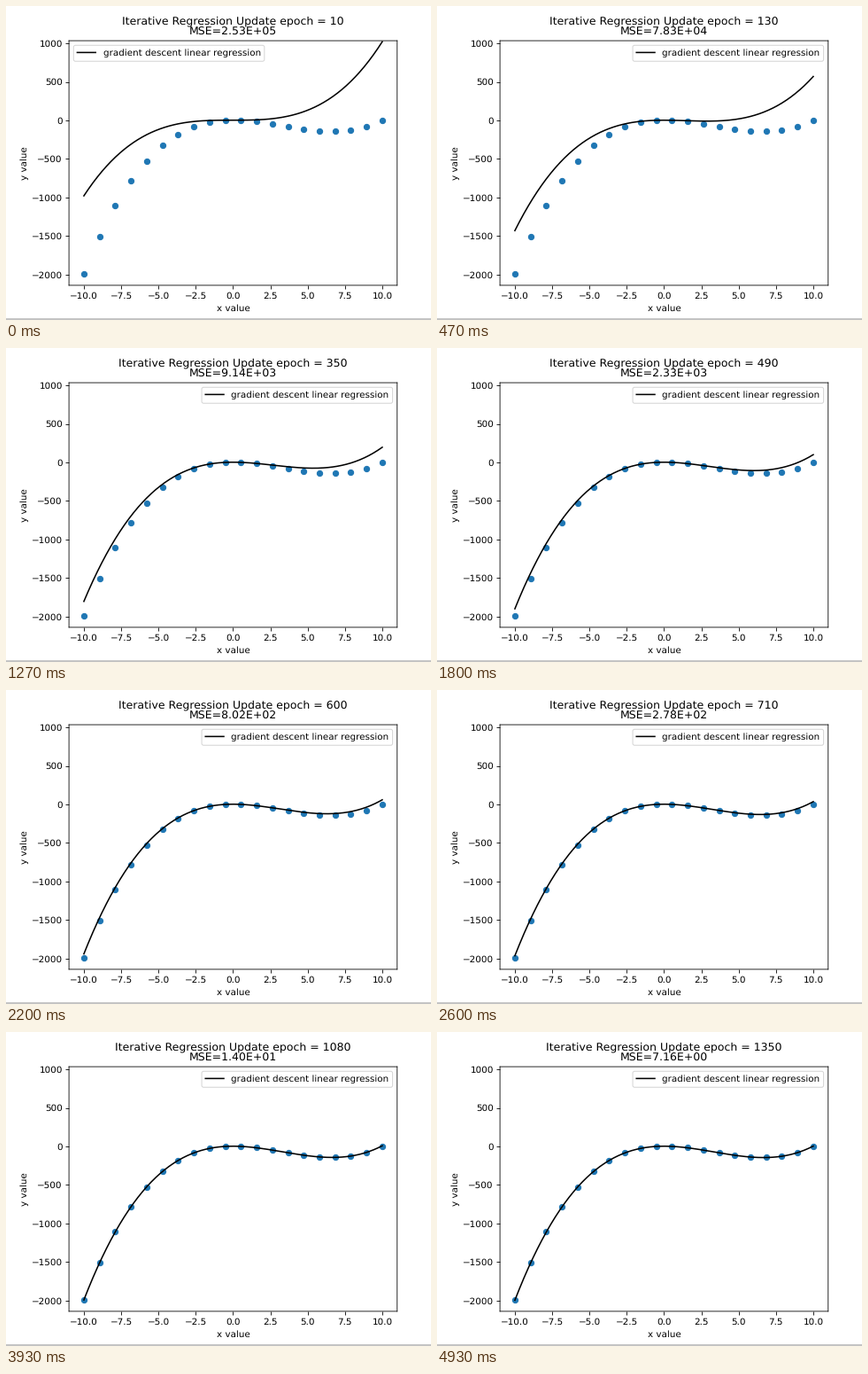
These frames come from a looping animation (480x354 px, 4990 ms). A matplotlib script:

```python
import matplotlib.pyplot as plt
import numpy as np
from matplotlib.animation import FuncAnimation
from matplotlib.lines import Line2D

W, H, DPI = 480, 354, 75
LOOP_MS, FRAMES = 4990, 75
EPOCHS_PER_LOG = 10
LOGS_PER_FRAME = 1.814      # the training log is sampled down to the frame rate

DECAY = 0.009764            # squared-error decay per epoch
MSE_START, MSE_FLOOR = 252600, 6.635
QUAD_ERROR = 10.185         # initial error of the quadratic coefficient

# soft, unsnapped edges, like a plot scaled down on screen
plt.rcParams.update({
    "font.family": "DejaVu Sans",
    "font.size": 9.97,
    "path.snap": False,
    "text.hinting": "none",
})

fig = plt.figure(figsize=(W / DPI, H / DPI), dpi=DPI, facecolor="white")
left, right, top, bottom = 71.1, 441.8, 39.1, 314.9
ax = fig.add_axes([left / W, 1 - bottom / H, (right - left) / W, (bottom - top) / H])
ax.set(xlim=(-11, 11), ylim=(-2140, 1034))
ax.set_xlabel("x value")
ax.set_ylabel("y value", labelpad=3)

xs = np.linspace(-10, 10, 20)
ax.scatter(xs, xs**3 - 10 * xs**2 + 5, color="C0", snap=False)

grid = np.linspace(-10, 10, 200)
curve, = ax.plot([], [], color="black", label="gradient descent linear regression")
ax.legend(loc="best")
title = ax.set_title("", linespacing=1.05)

# thin rule along the lower edge of the stage
fig.add_artist(Line2D([0, 1], [1 / H, 1 / H], color="#8c8c8c", lw=1, snap=True))


def update(i):
    epoch = EPOCHS_PER_LOG * (1 + int(i * LOGS_PER_FRAME))
    t = epoch - EPOCHS_PER_LOG
    quad = QUAD_ERROR * np.exp(-DECAY * t / 2) - 10
    mse = MSE_FLOOR + MSE_START * np.exp(-DECAY * t)
    curve.set_data(grid, grid**3 + quad * grid**2 + 2.4)
    title.set_text(f"Iterative Regression Update epoch = {epoch}\nMSE={mse:.2E}")
    return curve, title


anim = FuncAnimation(fig, update, frames=FRAMES, interval=LOOP_MS / FRAMES,
                     repeat=True, repeat_delay=0, blit=False)
plt.show()
```
